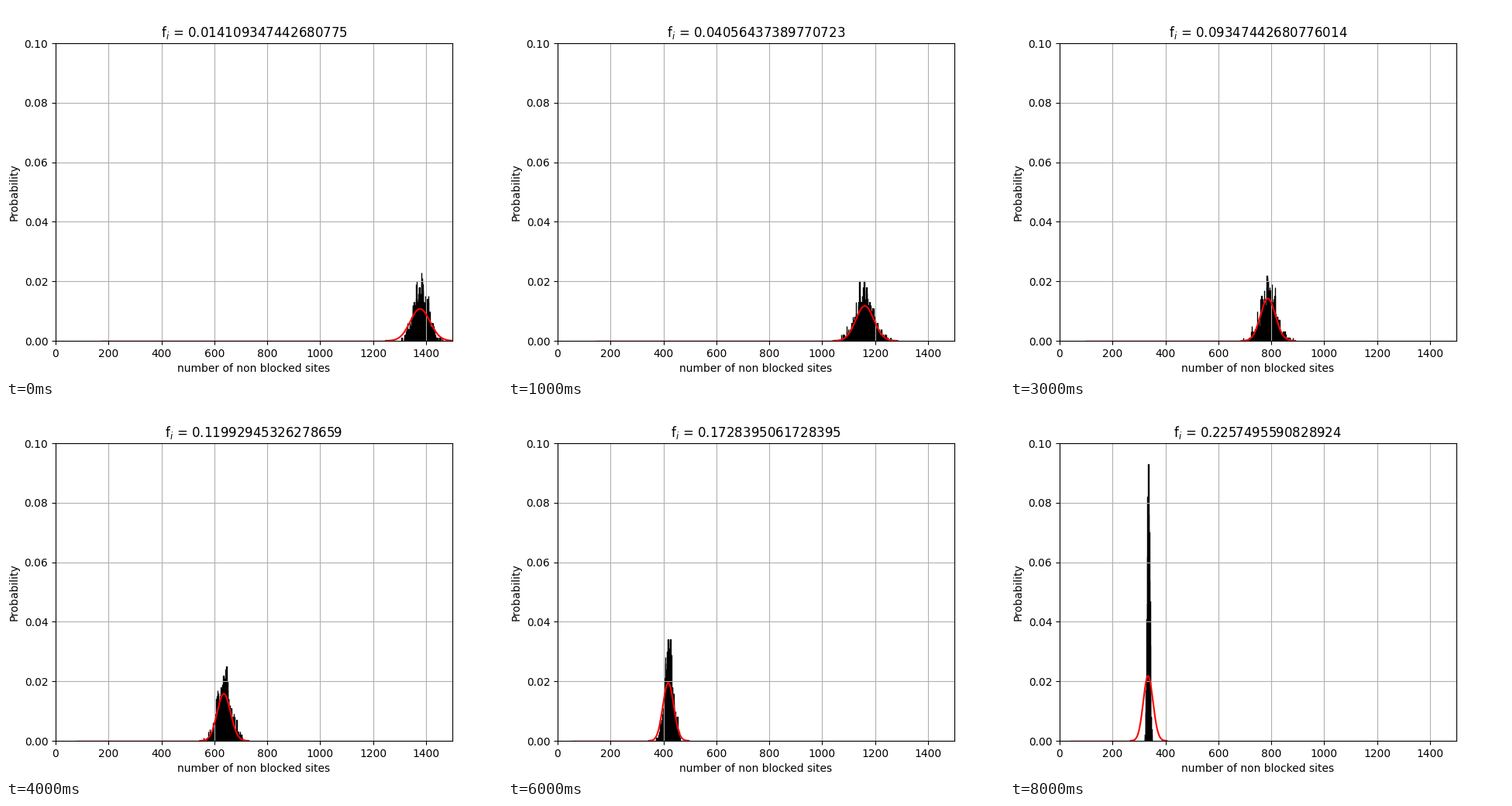
A matplotlib script that plays this animation: 640 px wide and 480 px high, repeating every 8500 ms.

```python
import numpy as np
import matplotlib.pyplot as plt
from matplotlib.animation import FuncAnimation

FRAMES, INTERVAL = 17, 500
SITES, RUNS = 1500, 1000
VISIBLE = 2e-5  # smaller probabilities vanish behind the axis

x = np.arange(SITES)
log_factorial = np.concatenate([[0], np.cumsum(np.log(x[1:]))])


def mean_sites(t):
    return 1378 - 1796 * t + 498 * t**2 + 255 * t**3


def spread(t):
    return 33 - 28.3 * t**1.6 - 8.5 * np.exp(-20 * t)


def poisson(mean):
    return np.exp(x * np.log(mean) - mean - log_factorial)


def histogram(i):
    t = i / (FRAMES - 1)
    rng = np.random.default_rng(100 + i)
    values = np.rint(rng.normal(mean_sites(t), spread(t), RUNS)).astype(int)
    return np.unique(values.clip(0, SITES - 1), return_counts=True)


fig = plt.figure(figsize=(6.4, 4.8), dpi=100)
ax = fig.add_axes([0.1, 0.1, 0.8, 0.8])


def draw(i):
    ax.clear()
    sites, counts = histogram(i)
    ax.bar(sites, counts / RUNS, width=1, align="edge",
           color="black", edgecolor="black", linewidth=1)

    mean = mean_sites(i / (FRAMES - 1))
    curve = poisson(mean)
    shown = curve > VISIBLE
    ax.plot(x[shown], curve[shown], color="red", linewidth=1.5)
    # faint left tail of the curve
    ax.plot([mean / 8, x[shown][0]], [0, 0], color="red", alpha=0.2,
            linewidth=1.5, solid_capstyle="butt")

    ax.set(xlim=(0, SITES), ylim=(0, 0.1),
           xlabel="number of non blocked sites", ylabel="Probability")
    ax.set_xticks(range(0, SITES, 200))
    ax.grid(True)
    ax.set_title(f"f$_i$ = {(16 + 15 * i) / 1134}")
    return []


anim = FuncAnimation(fig, draw, frames=FRAMES, init_func=lambda: [],
                     interval=INTERVAL, repeat=True, repeat_delay=0)
plt.show()
```
